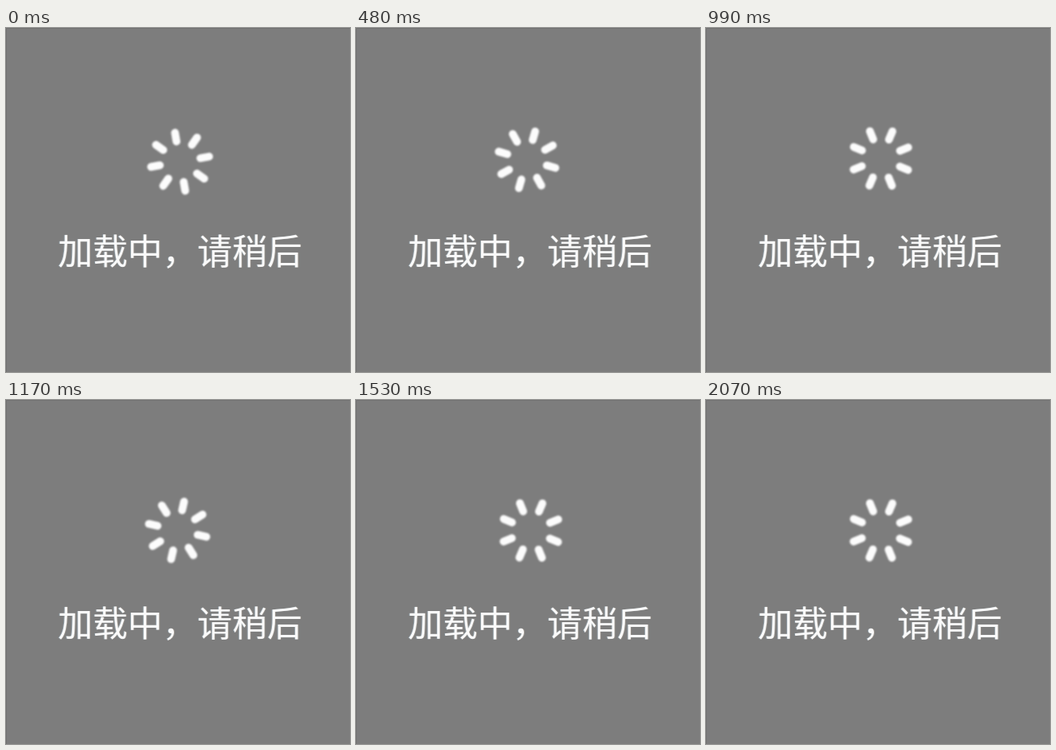
An HTML page that plays this animation: 432 by 432 pixels, repeating every 2100 ms.

```html
<!DOCTYPE html>
<html lang="zh-CN">
<head>
<meta charset="utf-8">
<title>加载中</title>
<style>
  html, body { margin: 0; width: 100%; height: 100%; overflow: hidden; background: #7d7d7d; }
  svg { display: block; width: 100vw; height: 100vh; }
  .edge { fill: none; stroke: #707070; stroke-width: 2; }
  .spoke { stroke: #fcfcfc; stroke-width: 9.8; stroke-linecap: round; }
  #spinner { filter: blur(1.1px); }
  text {
    font: 400 43.8px "Noto Sans CJK SC", "Noto Sans CJK", sans-serif;
    fill: #fafafa;
    filter: blur(.65px);
    text-shadow: -1px 0 rgba(190, 230, 255, .3), 1px 0 rgba(255, 225, 190, .2);
  }
</style>
</head>
<body>
<svg viewBox="0 0 432 432">
  <path class="edge" d="M0 432V0H432"/>
  <g id="spinner"><g id="ring"></g></g>
  <text x="65.2" y="297.2">加载中，请稍后</text>
</svg>
<script>
  const LOOP = 2100, TICK = 30;
  const PIVOT = [217.5, 165.5];
  const OFFSET = 2.7; // the ring sits slightly off its pivot, so it wobbles
  const ring = document.getElementById('ring');

  for (let i = 0; i < 8; i++) {
    const spoke = document.createElementNS('http://www.w3.org/2000/svg', 'line');
    spoke.setAttribute('class', 'spoke');
    spoke.setAttribute('x1', 25.8);
    spoke.setAttribute('x2', 37);
    spoke.setAttribute('transform', `translate(${OFFSET} 0) rotate(${15 + i * 45})`);
    ring.append(spoke);
  }

  // [tick, degrees]
  const turns = [[0, 65], [1, 65], [16, 181], [22, 231], [25, 252], [27, 271], [33, 323], [37, 358]];

  function angleAt(tick) {
    const i = Math.max(1, turns.findIndex(([t]) => t >= tick));
    const [t0, a0] = turns[i - 1], [t1, a1] = turns[i];
    return a0 + (a1 - a0) * (tick - t0) / (t1 - t0);
  }

  // After the first sweep, the last 18 ticks of it repeat.
  function sweepTick(tick) {
    const t = tick < 39 ? tick : 21 + (tick - 39) % 18;
    return Math.min(t, 37);
  }

  function draw(now) {
    const tick = Math.floor((now % LOOP) / TICK + 1e-6) % (LOOP / TICK);
    const angle = angleAt(sweepTick(tick));
    ring.setAttribute('transform', `translate(${PIVOT}) rotate(${angle})`);
  }

  let start;
  function frame(now) {
    start ??= now;
    draw(now - start);
    requestAnimationFrame(frame);
  }
  draw(0);
  requestAnimationFrame(frame);
</script>
</body>
</html>
```
